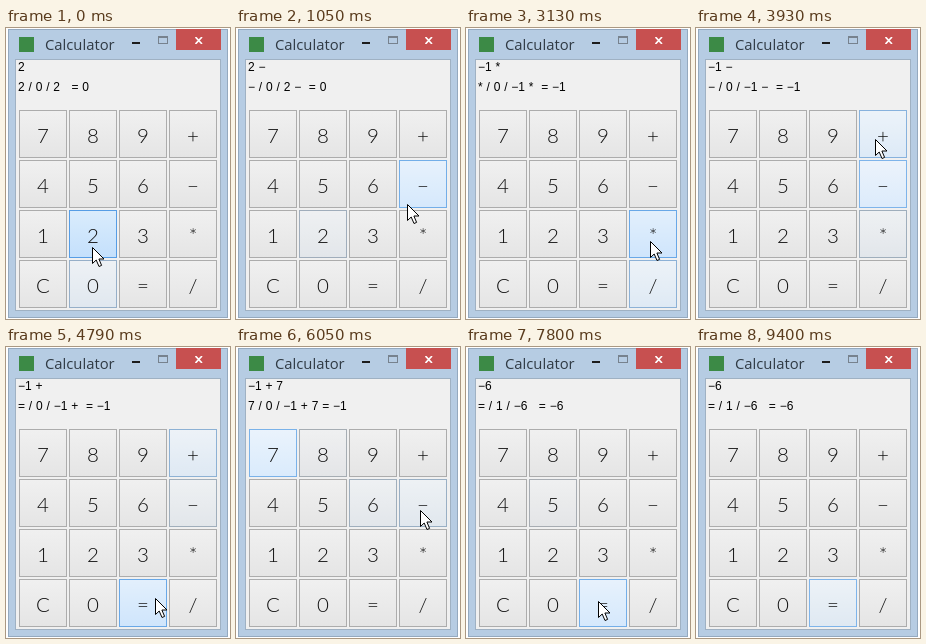
Recreate the animation shown at these times as an HTML page. Size 224 by 291 pixels, loop 9690 ms.

```html
<!DOCTYPE html>
<html lang="en">
<head>
<meta charset="utf-8">
<title>Calculator</title>
<style>
  html, body { margin: 0; width: 100%; height: 100%; overflow: hidden; background: #fff; }
  div, svg { position: absolute; box-sizing: border-box; }
  #stage { width: 224px; height: 291px; overflow: hidden; }
  #window { left: 2px; top: 1px; width: 220px; height: 289px; background: #b6cce3; border: 1px solid #94a9bf; }
  #icon { left: 13px; top: 9px; width: 15px; height: 15px; background: #3c8a46; }
  #title { left: 39px; top: 5px; font: 14.8px/22px "Open Sans", sans-serif; color: #303a44; }
  #minimize { left: 126px; top: 14px; width: 8px; height: 2px; background: #1c1c1c; }
  #maximize { left: 152px; top: 8px; width: 10px; height: 8px; border: 1px solid #77828e; border-top-width: 2px; }
  #close { left: 170px; top: 1px; width: 45px; height: 21px; background: #c75050; }
  #close svg { left: 19px; top: 8px; }
  #client { left: 9px; top: 31px; width: 206px; height: 252px; background: #f0f0f0; border: 1px solid #9fb1c3; }
  .line { left: 12px; font: 12px/14px "Liberation Sans", sans-serif; word-spacing: .5px; white-space: pre; color: #000; }
  #entry { top: 32px; }
  #status { top: 52px; }
  .key { width: 48px; height: 48px; border: 1px solid #acacac; isolation: isolate; text-align: center; color: #111;
         background: linear-gradient(#f0f0f0, #e5e5e5); font: 300 20.5px/48px Lato, sans-serif; }
  .key::before, .key::after { content: ""; position: absolute; inset: -1px; z-index: -1; border: 1px solid #7eb4ea;
         box-sizing: border-box; background: linear-gradient(#ecf4fc, #dcecfc); opacity: var(--hover); }
  .key::after { border-color: #569de5; background: linear-gradient(#daecfc, #c4e0fc); opacity: var(--press); }
  .key.focus { border-color: #7eb4ea; }
  .key.focus::before { background-clip: padding-box; }
</style>
</head>
<body>
<div id="stage">
  <div id="window"></div>
  <div id="icon"></div>
  <div id="title">Calculator</div>
  <div id="minimize"></div>
  <div id="maximize"></div>
  <div id="close"><svg width="8" height="7"><path d="M.5 0L7 7M7 0L.5 7" stroke="#fff" stroke-width="1.6"/></svg></div>
  <div id="client"></div>
  <div id="entry" class="line"></div>
  <div id="status" class="line"></div>
  <div id="keys"></div>
  <svg id="cursor" width="14" height="22"><path d="M.5 .5V16.5L4.2 13L7 19.5L9.6 18.4L6.9 12H12Z" fill="#fff" stroke="#000"/></svg>
</div>
<script>
const LOOP = 9690, TICK = 96, HOLD = 2, TRAVEL = 3, EXIT = 91;
const $ = id => document.getElementById(id);
const minus = text => text.replaceAll('-', '\u2212');

const keys = [...'789+456-123*C0=/'].map((label, i) => {
  const el = document.createElement('div');
  const x = 13 + i % 4 * 50, y = 82 + (i >> 2) * 50;
  el.className = 'key';
  el.textContent = minus(label);
  el.style.left = x + 'px';
  el.style.top = y + 'px';
  $('keys').append(el);
  return { label, x, y, el };
});

// Each click: tick, key and, where it matters, the offset from the key's centre
const clicks = [
  [0, '2', -1, 12], [8, '-'], [14, '3'], [21, '=', -2, 0], [26, '/'], [31, '*'], [36, '-'],
  [42, '+', -8, 4], [48, '=', 12, -6], [58, '7'], [64, '-'], [69, '5'], [78, '=', -5, -3]
].map(([tick, label, dx = -3, dy = 6]) => {
  const key = keys.find(k => k.label === label);
  return { tick, label, x: key.x + 24 + dx, y: key.y + 25 + dy };
});

// Rest on a key, then glide to the next one; finally drop out of the window
function cursorAt(tick) {
  const i = clicks.findLastIndex(c => c.tick + HOLD <= tick);
  const from = clicks[Math.max(i, 0)], to = clicks[i + 1] || from;
  const u = Math.min(1, Math.max(0, (tick - from.tick - HOLD) / TRAVEL)), e = u * u * (3 - 2 * u);
  const gone = Math.max(0, tick - EXIT);
  return [from.x + (to.x - from.x) * e + gone * 10, from.y + (to.y - from.y) * e + gone * 22];
}

function press(calc, label) {
  calc.key = label;
  calc.done = 0;
  if (/\d/.test(label)) {
    calc[calc.op ? 'b' : 'a'] = label;
  } else if (label !== '=') {
    calc.op = label;
    calc.b = '';
  } else if (calc.b) {
    calc.a = calc.total = calc.a - calc.b;
    calc.op = calc.b = '';
    calc.done = 1;
  }
}

// Heat: 0 idle, 1 hovered, 2 pressed
function stateAt(tick) {
  const calc = { a: '', op: '', b: '', total: 0 };
  const heat = keys.map(k => k.label === '0' ? 0.6 : 0);
  for (let t = 0; t <= tick; t++) {
    const [x, y] = cursorAt(t), click = clicks.find(c => c.tick === t);
    if (click) press(calc, click.label);
    keys.forEach((k, i) => {
      const over = x >= k.x && x < k.x + 48 && y >= k.y && y < k.y + 48;
      const rest = over ? 1 : k.label === calc.key ? 0.6 : 0;
      if (click && k.label === click.label) heat[i] = 2;
      else if (heat[i] < rest) heat[i] = Math.min(rest, heat[i] + 0.4);
      else heat[i] = Math.max(rest, heat[i] - (over ? 0.25 : 0.14));
    });
  }
  return { calc, heat };
}

function draw(tick) {
  const { calc, heat } = stateAt(tick), [x, y] = cursorAt(tick);
  const sum = `${calc.a} ${calc.op} ${calc.b}`;
  $('entry').textContent = minus(sum);
  $('status').textContent = minus(`${calc.key} / ${calc.done} / ${sum} = ${calc.total}`);
  keys.forEach(({ label, el }, i) => {
    el.classList.toggle('focus', label === calc.key);
    el.style.setProperty('--hover', Math.min(1, heat[i]));
    el.style.setProperty('--press', Math.max(0, heat[i] - 1));
  });
  $('cursor').style.transform = `translate(${Math.round(x)}px, ${Math.round(y)}px)`;
}

let shown = -1;
function frame() {
  const tick = Math.floor((performance.now() % LOOP + 40) / TICK);
  if (tick !== shown) draw(shown = tick);
  requestAnimationFrame(frame);
}
frame();
</script>
</body>
</html>
```
